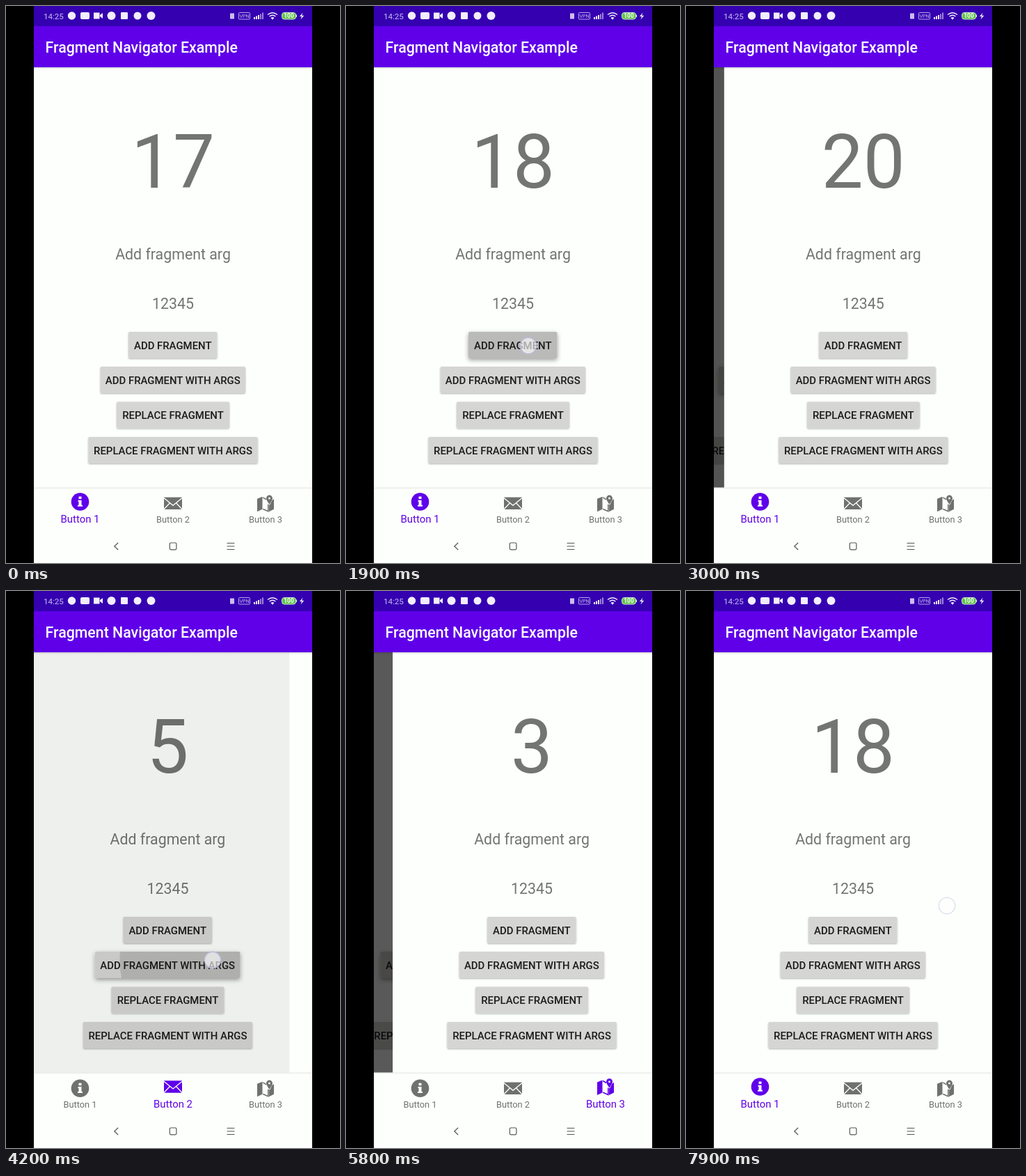
These frames come from a looping animation (480 px wide and 800 px high, 8000 ms). An HTML page:

```html
<!DOCTYPE html>
<html lang="en">
<head>
<meta charset="utf-8">
<title>Fragment stack demo</title>
<style>
html, body { margin: 0; width: 100%; height: 100%; overflow: hidden; background: #000; }
svg { display: block; width: 480px; height: 800px; font-family: Roboto, sans-serif; }
.mid { text-anchor: middle; }
.grey { fill: #737573; }
.btn { fill: #d5d6d3; }
.caps { font-size: 14.93px; font-weight: 500; fill: #1b1c1a; }
.body { font-size: 21.33px; }
.line { fill: none; stroke: #555; stroke-width: 1.2; stroke-linecap: round; }
</style>
</head>
<body>
<svg id="stage" viewBox="0 0 480 800">
  <defs>
    <clipPath id="body"><rect x="40" y="88" width="400" height="604.5"/></clipPath>
    <clipPath id="bar"><rect x="40" y="692.5" width="400" height="59.5"/></clipPath>
    <filter id="low" x="-10%" y="-20%" width="120%" height="150%">
      <feDropShadow dx="0" dy="1" stdDeviation="1" flood-opacity=".3"/>
    </filter>
    <filter id="high" x="-10%" y="-30%" width="120%" height="180%">
      <feDropShadow dx="0" dy="2.5" stdDeviation="3" flood-opacity=".38"/>
    </filter>
    <linearGradient id="fall" x2="0" y2="1">
      <stop stop-opacity=".16"/><stop offset="1" stop-opacity="0"/>
    </linearGradient>
  </defs>

  <rect width="480" height="800"/>
  <rect x="40" width="400" height="800" fill="#fdfffc"/>
  <g id="pages" clip-path="url(#body)"></g>
  <rect x="40" y="88" width="400" height="3" fill="url(#fall)"/>

  <rect x="40" width="400" height="29" fill="#3400b0"/>
  <rect x="40" y="29" width="400" height="59" fill="#5f00e9"/>
  <text x="56.5" y="67" font-size="21.33" font-weight="500" fill="#fff">Fragment Navigator Example</text>

  <g fill="#f3eeff">
    <text x="54" y="18.6" font-size="11.6" fill="#c9bcf0">14:25</text>
    <circle cx="94.500" cy="14" r="5.700"/>
    <rect x="107" y="9" width="13" height="10" rx="2"/>
    <path d="M126 9.500h8.500v9h-8.500zM135 13l4-3v8l-4-3z"/>
    <circle cx="151.500" cy="14" r="6"/>
    <rect x="165" y="9" width="10" height="10" rx="1"/>
    <circle cx="189" cy="14" r="5.500"/>
    <circle cx="208.500" cy="14" r="6"/>
    <rect x="322" y="10.500" width="6" height="8" opacity=".8"/>
    <rect x="334.500" y="9.500" width="16" height="9.500" rx="1" fill="none" stroke="#b9a8ec"/>
    <text class="mid" x="342.500" y="17" font-size="7.200" fill="#c9bcf0">VPN</text>
    <path d="M356 16h2v3h-2zM359 14.500h2v4.500h-2zM362 13h2v6h-2z"/>
    <path d="M365 11.500h2v7.500h-2zM368 9.500h2v9.500h-2z" opacity=".55"/>
    <g fill="none" stroke="#f3eeff" stroke-width="1.500">
      <path d="M376 12.500q7-5.500 14 0M378.500 15q4.500-3.500 9 0"/>
    </g>
    <path d="M380.500 17q2.500-2 5 0l-2.500 2.800z"/>
    <rect x="396.500" y="9.500" width="20" height="9.500" rx="3.500" fill="#5fc24a" stroke="#cfe9cf"/>
    <path d="M417.500 12.500v3.500" stroke="#cfe9cf"/>
    <text class="mid" x="406.500" y="17.200" font-size="8.300" font-weight="700" fill="#fff">100</text>
    <path d="M426.500 9.500l-4.500 5.500h3l-1.500 4.500 4.800-5.800h-3.200z"/>
  </g>

  <rect x="40" y="692.500" width="400" height="107.500" fill="#fdfffc"/>
  <path d="M40 692.300h400" stroke="#eceeec" stroke-width="1.800"/>
  <circle id="navRipple" cy="722" fill="#5f00e9" clip-path="url(#bar)"/>
  <g id="tabs"></g>

  <path class="line" d="M160.800 771.200l-5 4.800 5 4.800"/>
  <rect class="line" x="235.300" y="771" width="9.600" height="9.800" rx="1.800"/>
  <path class="line" d="M318 771.500h10M318 776h10M318 780.500h10"/>

  <circle id="touch" r="11.700" fill="#fff" fill-opacity=".62" stroke="#b9b9dc" stroke-width="1.500"/>
</svg>

<script>
const LOOP = 8000, STEP = 100, SLIDE = 250, WIDTH = 400, PARALLAX = 92;
const NS = 'http://www.w3.org/2000/svg';
const $ = id => document.getElementById(id);

function add(parent, tag, attrs = {}, text) {
  const el = parent.appendChild(document.createElementNS(NS, tag));
  set(el, attrs);
  if (text) el.textContent = text;
  return el;
}
function set(el, attrs) {
  for (const k in attrs) el.setAttribute(k, attrs[k]);
}
const clamp = v => Math.max(0, Math.min(1, v));

// Standard curve, cubic-bezier(.4, 0, .2, 1)
function ease(x) {
  let lo = 0, hi = 1, u;
  for (let i = 0; i < 20; i++) {
    u = (lo + hi) / 2;
    const v = 1 - u;
    if (1.2 * v * v * u + .6 * v * u * u + u * u * u < x) lo = u; else hi = u;
  }
  return x <= 0 ? 0 : x >= 1 ? 1 : u * u * (3 - 2 * u);
}

// Piecewise linear lookup in [time, value] pairs
function track(keys, t) {
  let [t0, v0] = keys[0];
  for (const [t1, v1] of keys) {
    if (t < t1) return t1 === t0 ? v0 : v0 + (v1 - v0) * clamp((t - t0) / (t1 - t0));
    [t0, v0] = [t1, v1];
  }
  return v0;
}

const BUTTONS = [
  ['ADD FRAGMENT', 176, 127.5, 468],
  ['ADD FRAGMENT WITH ARGS', 135.5, 208.5, 518],
  ['REPLACE FRAGMENT', 159, 162, 568.6],
  ['REPLACE FRAGMENT WITH ARGS', 118.3, 243.4, 619]
];

// [start, kind, from, to]
const MOVES = [
  [916, 'push', 17, 18],
  [1950, 'push', 18, 19],
  [2810, 'push', 19, 20],
  [3500, 'tab', 20, 5, 1],
  [4159, 'push', 5, 6],
  [4950, 'tab', 6, 2, 2],
  [5628, 'push', 2, 3],
  [6550, 'tab', 3, 20, 0],
  [6900, 'pop', 20, 19],
  [7500, 'pop', 19, 18]
];

// Page offset during each back swipe
const SWIPES = {
  6900: [[6900, 0], [7000, 34], [7100, 131.5], [7200, 300], [7300, 388], [7400, 400]],
  7500: [[7500, 0], [7600, 70], [7700, 185], [7800, 350], [7900, 400]]
};

// [down, up, x, y, button]; no button means a tab
const TAPS = [
  [760, 910, 297, 530, 1],
  [1800, 1950, 262, 488, 0],
  [2700, 2810, 297, 530, 1],
  [3380, 3480, 240, 722],
  [4080, 4210, 297, 530, 1],
  [4830, 4930, 373, 722],
  [5480, 5610, 297, 530, 1],
  [6430, 6530, 106.5, 722]
];

function makePage(id) {
  const g = add($('pages'), 'g');
  add(g, 'rect', { x: 40, y: 88, width: WIDTH, height: 605, fill: '#fdfffc' });
  const label = (y, cls, size) => add(g, 'text', { class: 'mid grey ' + cls, x: 240, y, ...size });
  const num = label(260.5, '', { 'font-size': 106.67 });
  const name = label(364, 'body'), value = label(434.5, 'body');
  const buttons = BUTTONS.map(([text, x, w, y], i) => {
    const box = { x, y, width: w, height: 38, rx: 2 };
    const clip = add(g, 'clipPath', { id: id + i });
    add(clip, 'rect', box);
    const face = add(g, 'rect', { class: 'btn', ...box });
    const ripple = add(g, 'circle', { 'clip-path': `url(#${id + i})` });
    add(g, 'text', { class: 'mid caps', x: x + w / 2, y: y + 24.8 }, text);
    return { face, ripple };
  });
  return { g, num, name, value, buttons };
}

function showPage(page, n, dx) {
  page.g.setAttribute('transform', `translate(${dx} 0)`);
  page.num.textContent = n;
  page.name.textContent = n === 19 ? '---' : 'Add fragment arg';
  page.value.textContent = n === 19 ? '---' : '12345';
}

function pressButtons(page, t) {
  page.buttons.forEach(({ face, ripple }, i) => {
    const tap = TAPS.find(p => p[4] === i && t >= p[0] && t < p[1] + 250);
    face.setAttribute('filter', tap ? 'url(#high)' : 'url(#low)');
    set(ripple, tap
      ? { cx: tap[2] + 8, cy: tap[3], r: 134 * Math.min(1.6, (t - tap[0]) / 120),
          opacity: .13 * clamp(1 - (t - tap[1]) / 250) }
      : { r: 0, opacity: 0 });
  });
}

const under = makePage('u');
const dim = add($('pages'), 'rect', { x: 40, y: 88, width: WIDTH, height: 605 });
const over = makePage('o');

// Icons are centred on the origin
const ICONS = [
  g => {
    add(g, 'circle', { r: 12.8 });
    add(g, 'path', { d: 'M-2-7.500h4v3.500h-4zM-3-2.300h5v7h1.500v2h-7v-2h1.500v-5h-1z', fill: '#fff' });
  },
  g => {
    add(g, 'rect', { x: -13, y: -8.7, width: 26, height: 17.4 });
    add(g, 'path', {
      d: 'M-13.500-8L0 3 13.500-8M-13 8.500l8.500-9M13 8.500l-8.500-9',
      fill: 'none', stroke: '#fdfffc', 'stroke-width': 1.3
    });
  },
  g => {
    add(g, 'path', { d: 'M-12-6.500l7.500-3v18l-7.500 3.500zM5 1.500l1 1 3.500-7 2.500-1.500v14.500l-7 3.500z' });
    add(g, 'path', { d: 'M-3.700-8.500l4.700 3M-3.700 8.200l7.500 3.300v-10', fill: 'none', 'stroke-width': 1.6, class: 'edge' });
    add(g, 'path', { d: 'M5.500 1.500q-4.500-6-4.500-8.700a4.500 4.500 0 0 1 9 0q0 2.700-4.500 8.700z' });
    add(g, 'circle', { cx: 5.5, cy: -7.2, r: 1.5, fill: '#fdfffc' });
  }
];
const tabs = ICONS.map((draw, i) => {
  const x = [106.5, 240, 373][i];
  const g = add($('tabs'), 'g'), icon = add(g, 'g');
  draw(icon);
  const label = add(g, 'text', { class: 'mid', x, y: 741.5 }, 'Button ' + (i + 1));
  return { x, g, icon, label };
});

function drawTabs(t) {
  let now = 0, before = 0, since = -1000;
  for (const [start, kind, , , tab] of MOVES)
    if (kind === 'tab' && t >= start) { before = now; now = tab; since = start; }
  const k = ease((t - since) / 115);
  tabs.forEach(({ x, g, icon, label }, i) => {
    const on = i === now ? k : i === before ? 1 - k : 0;
    const color = i === now ? '#5f00e9' : '#6f716f';
    set(g, { fill: color, stroke: 'none' });
    g.querySelectorAll('.edge').forEach(e => e.setAttribute('stroke', color));
    icon.setAttribute('transform', `translate(${x} ${714.3 - 2.3 * on})`);
    set(label, { 'font-size': 12.8 + 2.13 * on, 'font-weight': 400 });
  });
  const tap = TAPS.find(p => p[4] === undefined && t >= p[0] && t < p[1] + 400);
  set($('navRipple'), tap
    ? { cx: tap[2], r: 73 * ease((t - tap[0] + 60) / 260), opacity: .12 * clamp(1 - (t - tap[1]) / 400) }
    : { r: 0, opacity: 0 });
}

function drawPages(t) {
  const move = MOVES.filter(m => t >= m[0]).pop();
  let top = 17, below = 17, dx = 0, moving = false;
  if (move) {
    const [start, kind, from, to] = move;
    top = to;
    if (kind === 'push') {
      dx = WIDTH * (1 - ease((t - start) / SLIDE));
      below = from;
      moving = dx > 0;
    } else if (kind === 'pop') {
      const off = track(SWIPES[start], t);
      if (off < WIDTH) { top = from; below = to; dx = off; moving = true; }
    }
  }
  const p = 1 - dx / WIDTH;
  showPage(over, top, dx);
  showPage(under, below, -PARALLAX * p);
  under.g.style.display = dim.style.display = moving ? '' : 'none';
  dim.setAttribute('opacity', .7 * p);
  const pushing = moving && move[1] === 'push';
  pressButtons(under, pushing ? t : -1);
  pressButtons(over, pushing ? -1 : t);
}

function drawTouch(t) {
  let x = 0, y = 452, opacity = 0;
  const tap = TAPS.find(p => t >= p[0] && t < p[1] + 60);
  if (tap) [x, y, opacity] = [tap[2], tap[3], 1];
  else if (t >= 6900 && t < 7200) {
    x = 189 + track(SWIPES[6900], t);
    opacity = 1;
  } else if (t >= 7500) {
    x = 190 + Math.min(185, track(SWIPES[7500], t));
    opacity = t < 7800 ? 1 : t < 7900 ? .7 : .42;
  }
  set($('touch'), { cx: x, cy: y, opacity });
}

function render() {
  const t = Math.floor(performance.now() % LOOP / STEP) * STEP;
  drawPages(t);
  drawTabs(t);
  drawTouch(t);
  requestAnimationFrame(render);
}
render();
</script>
</body>
</html>
```
